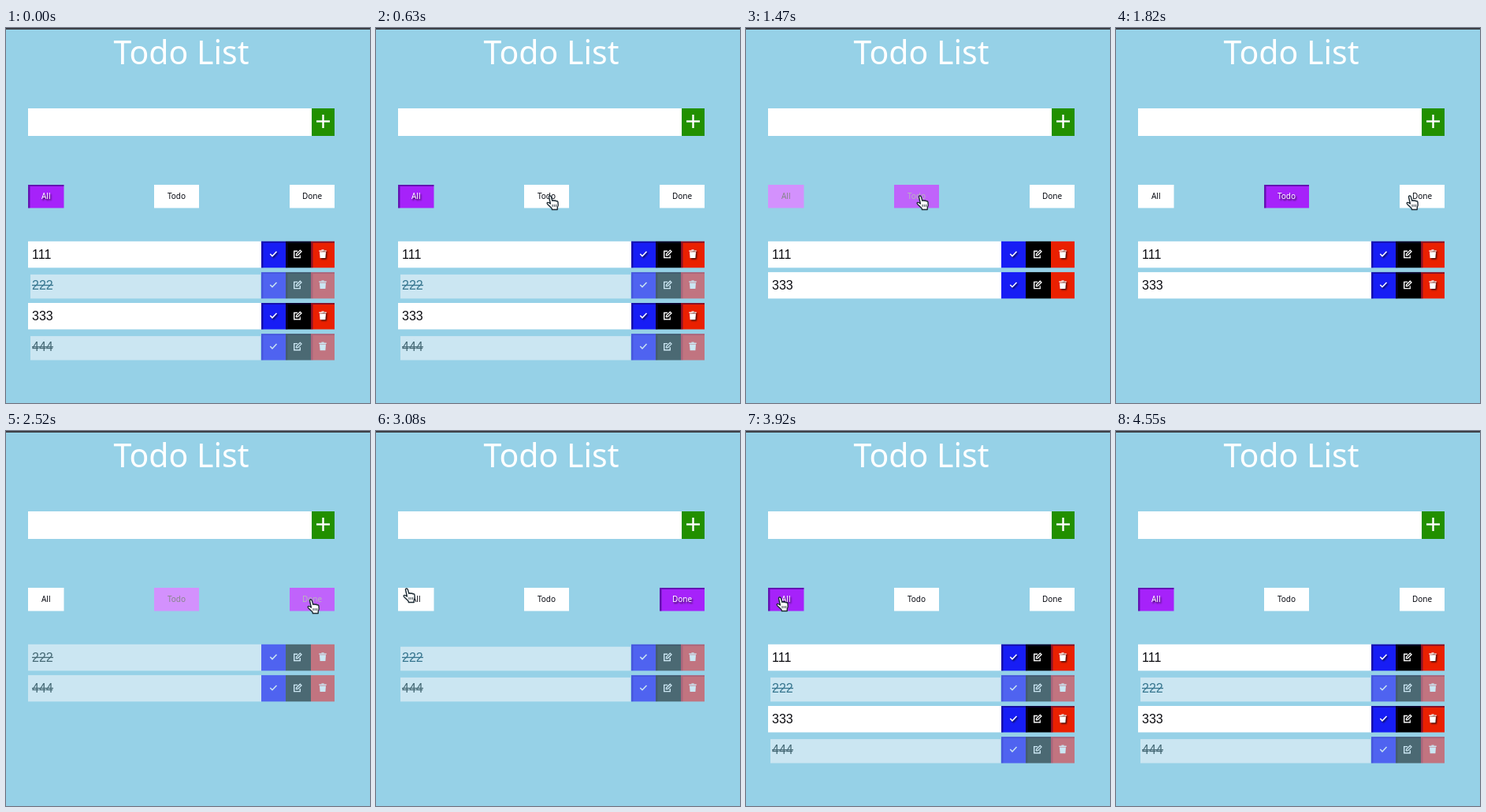
An HTML page with a canvas for the animation above (4.76 s loop, 462 px wide and 476 px high).

```html
<!DOCTYPE html>
<html lang="en">
<head>
<meta charset="utf-8">
<title>Todo List</title>
<style>
  html, body { margin: 0; width: 100%; height: 100%; overflow: hidden; background: #96d1e7; }
  canvas { display: block; }
</style>
</head>
<body>
<canvas id="stage" width="462" height="476"></canvas>
<script>
const ctx = document.getElementById('stage').getContext('2d');
const LOOP = 4760, STEP = 70, FADE = 140;
const BG = '#96d1e7';
const UI_FONT = '"Noto Sans", "Open Sans", sans-serif';
const ROW_FONT = '"Liberation Sans", Arial, sans-serif';

const tabs = [
  { name: 'All', x: 28, w: 45.5 },
  { name: 'Todo', x: 188, w: 57 },
  { name: 'Done', x: 360, w: 57 }
];
const items = ['111', '222', '333', '444'].map((text, i) => ({ text, done: i % 2 === 1 }));
const filters = [() => true, item => !item.done, item => item.done];

// Each click shows a ring, then switches the filter when released.
const clicks = [
  { at: 1400, tab: 1, x: 221.5, y: 213.5 },
  { at: 2450, tab: 2, x: 387, y: 214 },
  { at: 3780, tab: 0, x: 42, y: 211 }
];

// Pointer tip: time, x, y
const path = [
  [70, 300, 418], [630, 221, 213], [1470, 221, 213], [1820, 373, 213],
  [1960, 373, 213], [2100, 387, 214], [2730, 387, 214], [3080, 39, 200],
  [3290, 41, 207], [3360, 43, 210], [3640, 43, 211], [4130, 43, 211], [4550, 210, 480]
];

const mix = (a, b, p) => `rgb(${a.map((v, i) => Math.round(v + (b[i] - v) * p))})`;
const WHITE = [255, 255, 255], BLACK = [10, 12, 20], PURPLE = [166, 34, 250];

function rect(x, y, w, h, color) {
  ctx.fillStyle = color;
  ctx.fillRect(x, y, w, h);
}

function label(text, x, y, font, color, align = 'center') {
  ctx.font = font;
  ctx.fillStyle = color;
  ctx.textAlign = align;
  ctx.fillText(text, x, y);
}

function line(points, color, width) {
  ctx.beginPath();
  points.forEach(([x, y]) => ctx.lineTo(x, y));
  ctx.strokeStyle = color;
  ctx.lineWidth = width;
  ctx.stroke();
}

function shadow(on) {
  ctx.shadowColor = on ? 'rgba(0,0,0,.7)' : 'transparent';
  ctx.shadowBlur = on ? 2 : 0;
  ctx.shadowOffsetX = ctx.shadowOffsetY = on ? 1.5 : 0;
}

// Dark top and left edges of a sunken button
function sunken(x, y, w, h, alpha) {
  const color = `rgba(20,0,90,${alpha})`;
  rect(x, y, w, 2, color);
  rect(x, y + 2, 2.5, h - 2, color);
}

function drawTab(tab, level) {
  rect(tab.x, 199, tab.w, 29.5, mix(WHITE, PURPLE, level));
  if (level === 1) {
    sunken(tab.x, 199, tab.w, 29.5, 0.45);
    shadow(true);
  }
  label(tab.name, tab.x + tab.w / 2, 217, '10px ' + UI_FONT, mix(BLACK, WHITE, level));
  shadow(false);
}

function checkIcon(x, y, color) {
  line([[x - 4, y], [x - 1.3, y + 2.8], [x + 4.2, y - 3]], color, 1.5);
}

function editIcon(x, y, color) {
  line([[x, y - 3.5], [x - 4.3, y - 3.5], [x - 4.3, y + 4.7],
        [x + 3.3, y + 4.7], [x + 3.3, y + 1.2]], color, 1.4);
  line([[x - 1.8, y + 2], [x - 1.3, y - 0.2], [x + 3.3, y - 4.7],
        [x + 5, y - 3], [x + 0.4, y + 1.5], [x - 1.8, y + 2]], color, 1.3);
}

function trashIcon(x, y, color) {
  rect(x - 4.7, y - 4.5, 9.4, 1.4, color);
  rect(x - 1.6, y - 5.5, 3.2, 1.2, color);
  ctx.beginPath();
  ctx.moveTo(x - 4, y - 2.5);
  ctx.lineTo(x + 4, y - 2.5);
  ctx.lineTo(x + 3.4, y + 5.2);
  ctx.lineTo(x - 3.4, y + 5.2);
  ctx.fill();
}

function drawRow(item, y, settled) {
  const { text, done } = item;
  const h = 33.5, mid = y + 16.5;
  if (done) {
    const inset = settled ? 3 : 0;
    rect(28 + inset, y + inset, 296 - inset * 1.3, h - inset, '#cbe6f2');
  } else {
    rect(28, y, 296, h, '#fff');
  }
  const ink = !done ? '#0b0b10' : settled && text === '222' ? '#37768f' : '#466a76';
  label(text, 33, y + 22, '16px ' + ROW_FONT, ink, 'left');
  if (done) rect(33, y + 16, 27, 1.3, ink);

  const colors = done ? ['#4f63f0', '#4b6973', '#c17480'] : ['#171df5', '#000', '#ea2000'];
  const icons = [checkIcon, editIcon, trashIcon];
  [324, 355, 387].forEach((x, i) => {
    const w = [31, 32, 30][i];
    rect(x, y, w, h, colors[i]);
    if (settled) sunken(x, y, w, h, done ? 0.12 : 0.45);
    shadow(!done);
    icons[i]([339.3, 370, 402][i], mid - 0.5, done ? '#cbe6f2' : '#fff');
    shadow(false);
  });
}

function drawHand(x, y) {
  ctx.save();
  ctx.translate(x - 5, y - 1);
  ctx.lineJoin = 'round';
  ctx.fillStyle = '#fff';
  ctx.strokeStyle = '#1b2a33';
  ctx.lineWidth = 1.4;
  ctx.stroke(ctx.fill(hand) || hand);
  line([[8, 12], [8, 15]], '#1b2a33', 0.9);
  line([[10.3, 12], [10.3, 15]], '#1b2a33', 0.9);
  line([[12.6, 12], [12.6, 15]], '#1b2a33', 0.9);
  ctx.restore();
}
const hand = new Path2D('M3.5 2.5Q3.3 1 4.8 1Q6 1 6.4 2.4L7.8 7.4Q8.8 6.2 10.2 7.4' +
  'Q11.7 6.4 12.7 7.9Q14.6 7.2 15 9.4Q15.7 13 14.3 15.6L14.2 18.5H7.4L7 16.8' +
  'L2 11.9Q.5 10.3 1.6 9.5Q2.8 8.8 5.4 11Z');

function pointerAt(t) {
  const i = path.findIndex(p => p[0] > t);
  if (i < 1) return null;
  const [t0, x0, y0] = path[i - 1], [t1, x1, y1] = path[i];
  const p = (t - t0) / (t1 - t0), e = p * p * (3 - 2 * p);
  return [x0 + (x1 - x0) * e, y0 + (y1 - y0) * e];
}

function draw(t) {
  const past = clicks.filter(c => c.at <= t);
  const last = past[past.length - 1];
  const current = last ? last.tab : 0;
  const previous = past.length > 1 ? past[past.length - 2].tab : 0;
  const p = last ? Math.min(1, (t - last.at) / FADE) : 1;

  rect(0, 0, 462, 476, BG);
  rect(0, 0, 462, 2, '#3d4047');
  label('Todo List', 222.5, 45.5, '500 41px ' + UI_FONT, '#fff');

  rect(28, 102, 360, 35, '#fff');
  rect(388, 102, 29, 35, '#229000');
  line([[394, 118.5], [411, 118.5]], '#fff', 2.4);
  line([[402.5, 110], [402.5, 127]], '#fff', 2.4);

  tabs.forEach((tab, i) => {
    const level = i === current ? Math.sqrt(p) : i === previous ? 1 - p : 0;
    drawTab(tab, level);
  });
  items.filter(filters[current]).forEach((item, i) => drawRow(item, 270.8 + i * 39.1, p === 1));

  const tip = pointerAt(t);
  if (tip) drawHand(...tip);

  const press = clicks.find(c => t >= c.at - 140 && t < c.at);
  if (press) {
    ctx.beginPath();
    ctx.arc(press.x, press.y, 31, 0, Math.PI * 2);
    ctx.strokeStyle = '#0c1014';
    ctx.lineWidth = 1.3;
    ctx.stroke();
  }
}

function frame(now) {
  draw(Math.floor((now % LOOP) / STEP) * STEP);
  requestAnimationFrame(frame);
}
requestAnimationFrame(frame);
</script>
</body>
</html>
```
